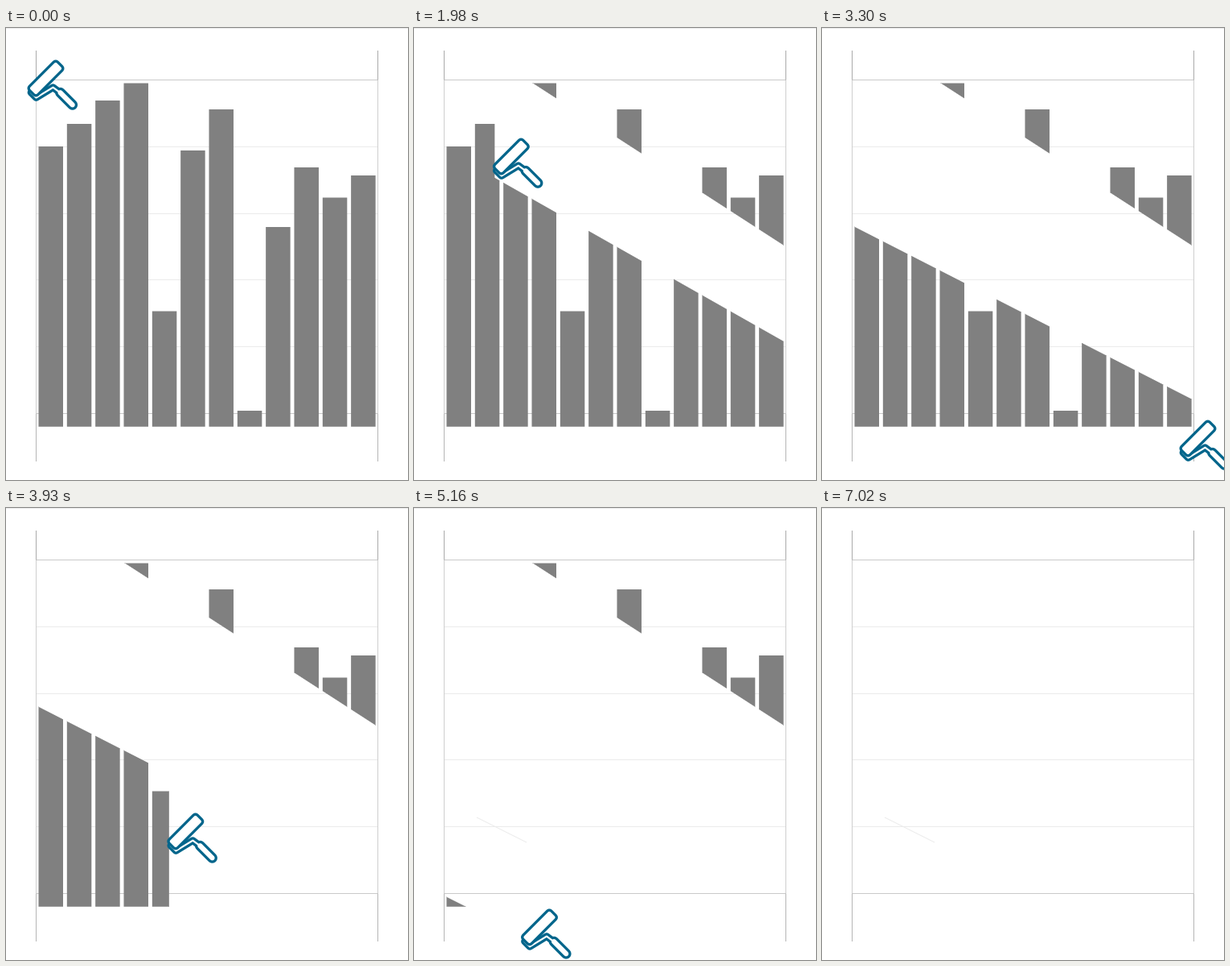
A matplotlib script that plays this animation: 500x561 px, repeating every 7110 ms.

```python
from collections import namedtuple

import numpy as np
import matplotlib.pyplot as plt
from matplotlib.animation import FuncAnimation
from matplotlib.lines import Line2D
from matplotlib.patches import FancyBboxPatch
from matplotlib.transforms import Affine2D

W, H, DPI = 500, 561, 100
FRAMES, STEP, DONE = 237, 30, 234
PX = 72 / DPI
GRAY, BLUE = 128, "#00658b"
OUTLINE = 3.3
LEFT, RIGHT, TOP, BASE = 37.5, 462.5, 64.5, 478.5
BAR_TOPS = [147, 119, 90, 68.5, 351.5, 152, 101, 475, 247, 173, 210.5, 183]

# path: roller way points (step, dx, dy)
# upper, lower: edges of the painted band as (height at the left bar, slope)
# spread: how far the upper edge still has to rise when the stroke begins
Stroke = namedtuple("Stroke", "path upper lower spread", defaults=[0])
STROKES = [
    Stroke([(0, 0, 0), (48, 471, 278)], (-0.4, 0.645), (84.9, 0.575), 34),
    Stroke([(49, 382, 274), (71, -20, 45)], (63, 0.6), (152.3, 0.565)),
    Stroke([(72, -16, 50), (96, 248, 261), (110, 418, 447), (120, 476, 459)],
           (140, 0.565), (247, 0.51)),
    Stroke([(121, 376, 462), (144, -89, 179)], (232, 0.51), (427, 0.535)),
    Stroke([(145, -96, 317), (177, 144, 484), (183, 144, 521)],
           (400, 0.535), (483, 0.5)),
    Stroke([(184, 144, 521), (204, -85, 409)], (470, 0.48), (600, 0)),
    Stroke([(205, -88, -143), (233, 411, 174)], (-100, 0.645), (3, 0.645)),
]

Y0, Y1 = 64, 500
yy, xx = np.mgrid[Y0:Y1, 0:W].astype(np.float32) + np.float32(0.5)


def cover(dist):
    """Antialiased coverage from a signed distance to an edge."""
    return np.clip(dist + 0.5, 0, 1)


def below(y, slope):
    dist = yy - np.float32(y) - np.float32(slope) * (xx - 41)
    return cover(dist * np.float32(1 / np.hypot(1, slope)))


def position(path, n):
    steps, xs, ys = zip(*path)
    return np.interp(n, steps, xs), np.interp(n, steps, ys)


def painted(stroke, n):
    """Area the stroke has covered at step n."""
    (start, x_start, _), (end, x_end, _) = stroke.path[0], stroke.path[-1]
    to_go = max(0, (end - n) / (end - start))
    y, slope = stroke.upper
    area = below(y + stroke.spread * to_go, slope) * (1 - below(*stroke.lower))
    if n > end:
        return area
    x, y = position(stroke.path, n)
    if x_end < x_start:
        return area * cover(xx - np.float32(x + 29))
    ahead = (xx - np.float32(x + 48)) + (yy - np.float32(y + 61))
    return area * cover(-ahead * np.float32(np.sqrt(0.5)))


def make_bars():
    area = np.zeros_like(xx)
    for i, top in enumerate(BAR_TOPS):
        x = 40.5 + 35.33 * i
        area += (cover(xx - x) * cover(x + 30.5 - xx)
                 * cover(yy - top) * cover(494.8 - yy))
    return area


bars = make_bars()

fig = plt.figure(figsize=(W / DPI, H / DPI), dpi=DPI, facecolor="white")
ax = fig.add_axes([0, 0, 1, 1])
ax.axis("off")


def rule(xs, ys, color, z=1):
    return ax.plot(xs, ys, color=color, lw=PX, zorder=z, snap=False,
                   solid_capstyle="butt")[0]


rule([0, W], [0.5, 0.5], "#ececec")
for y in np.round(np.linspace(TOP, BASE, 6)[1:-1] - 0.5) + 0.5:
    rule([LEFT, RIGHT], [y, y], "#ebebeb")
for y in (TOP, BASE):
    rule([LEFT, RIGHT], [y, y], "#cacaca")
for x in (LEFT, RIGHT):
    rule([x, x], [TOP, BASE], "#cecece")
    rule([x, x], [28, TOP], "#aaaaaa")
    rule([x, x], [BASE, 538], "#b6b6b6")
seam = rule([78, 140], [384, 415], "#ececec", 3)

pixels = np.full((Y1 - Y0, W, 4), GRAY, np.uint8)
image = ax.imshow(pixels, extent=(0, W, Y1, Y0), interpolation="nearest",
                  aspect="auto", zorder=2)
ax.set_xlim(0, W)
ax.set_ylim(H, 0)


def rod(points, width, color, z):
    xs, ys = zip(*points)
    return ax.add_line(Line2D(xs, ys, color=color, lw=width * PX, zorder=z,
                              solid_capstyle="round",
                              solid_joinstyle="round"))


def make_roller():
    """Parts of the paint roller, each with its own local transform."""
    arm = [(31, 80), (37.5, 86.5), (58.5, 73.7), (67, 80)]
    grip = [(67.5, 80.2), (82.7, 95.4)]
    parts = [(rod(points, width + edge, color, z), Affine2D())
             for color, edge, z in ((BLUE, OUTLINE, 4), ("white", -OUTLINE, 5))
             for points, width in ((arm, 5.5), (grip, 9.5))]
    head = FancyBboxPatch((-24.8, -7.4), 49.6, 14.8,
                          boxstyle="round,pad=0,rounding_size=4",
                          fc="white", ec=BLUE, lw=OUTLINE * PX, zorder=6)
    ax.add_patch(head)
    parts.append((head, Affine2D().rotate_deg(-45).translate(49.5, 62.5)))
    return parts


roller = make_roller()


def update(n):
    begun = [s for s in STROKES if s.path[0][0] <= n]
    left = bars
    for stroke in begun:
        left = np.minimum(left, 1 - painted(stroke, n))
    pixels[..., 3] = np.round(left * 255)
    image.set_data(pixels)
    seam.set_visible(n >= 150)

    x, y = position(begun[-1].path, n)
    for part, local in roller:
        part.set_transform(local + Affine2D().translate(x, y) + ax.transData)
        part.set_visible(n < DONE)
    return [image, seam, *(part for part, _ in roller)]


anim = FuncAnimation(fig, update, frames=FRAMES, interval=STEP,
                     repeat=True, repeat_delay=0, blit=False)
plt.show()
```
